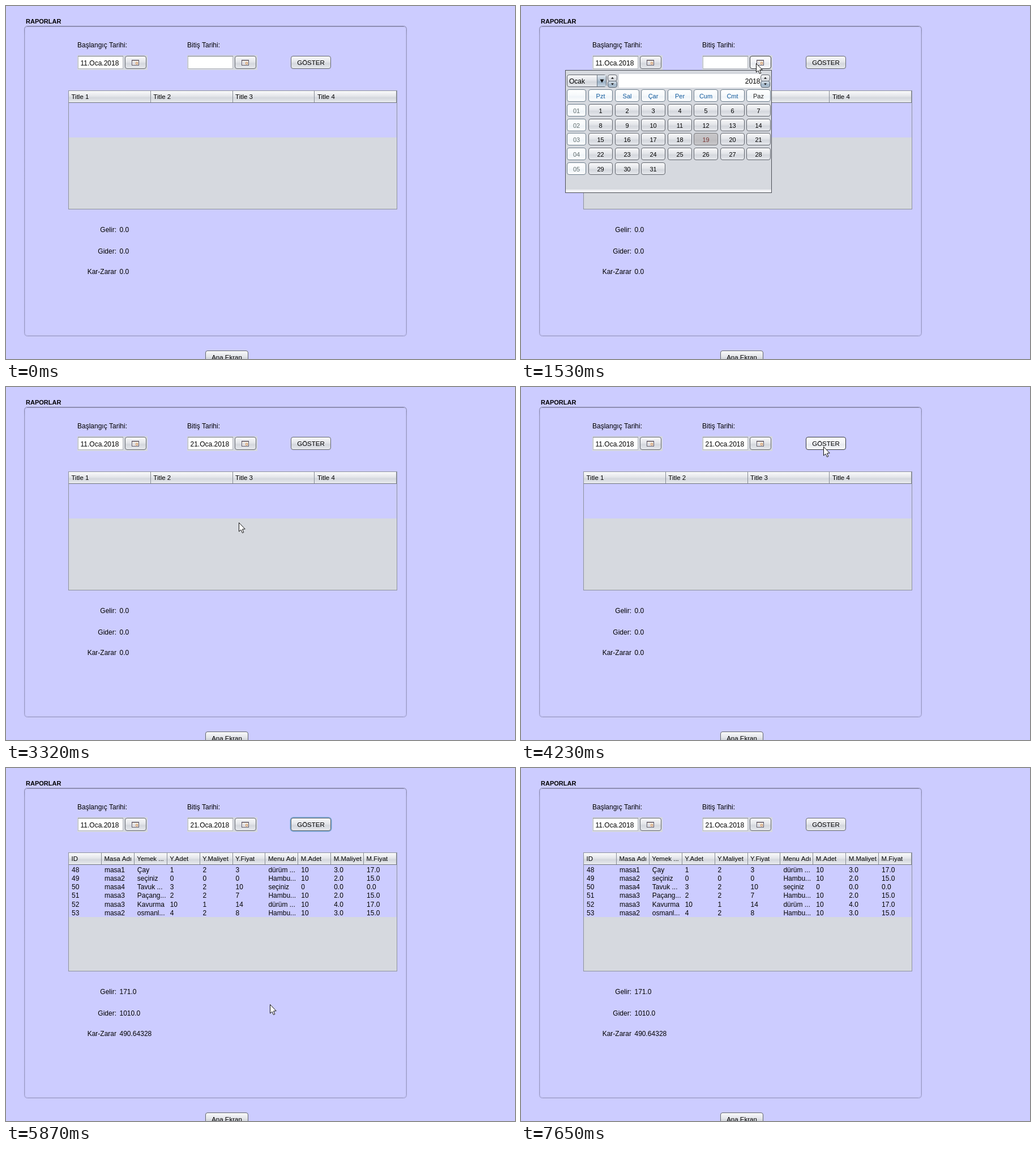
Write an HTML page with a canvas that moves like this. It is 899x623 px and loops after 7.72 s.

```html
<!DOCTYPE html>
<html lang="tr">
<head>
<meta charset="utf-8">
<title>Raporlar</title>
<style>
html, body { margin: 0; width: 100%; height: 100%; overflow: hidden; background: #ccccff; }
canvas { display: block; }
</style>
</head>
<body>
<canvas id="stage" width="899" height="623"></canvas>
<script>
const ctx = document.getElementById('stage').getContext('2d');
const LOOP = 7720;
const LILAC = '#ccccff', GRAY = '#d6d9df';

// Four gradient stops from top to bottom, then the border colour
const SKINS = {
  normal: ['#fafafb', '#e4e6ea', '#d4d7dd', '#e9ebef', '#62666e'],
  hover: ['#ffffff', '#f2f3f7', '#e8eaef', '#fbfcfd', '#34373d'],
  press: ['#78899b', '#8fa0b1', '#98a8b8', '#b5c2cf', '#33383f'],
  pale: ['#ffffff', '#f7fafc', '#eff4f8', '#ffffff', '#6c7d8c'],
  today: ['#c9c8ca', '#c2c1c4', '#bdbcbf', '#c9c8cb', '#77787d'],
  blue: ['#e2e9f0', '#b3c3d2', '#9bb1c5', '#c8d6e3', '#525e6c'],
};

// Pointer moves: first step, last step, number of steps, from, to
const MOVES = [
  [300, 530, 4, 775, 585, 446, 153],
  [830, 1160, 5, 446, 153, 415, 101],
  [1690, 2460, 11, 415, 101, 410, 237],
  [2530, 2530, 1, 410, 237, 411, 245],
  [2930, 3010, 2, 411, 245, 411, 239],
  [3630, 4230, 9, 411, 239, 534, 105],
  [5550, 5866, 5, 534, 105, 466, 417],
  [5945, 6100, 3, 466, 417, 455, 560],
  [6410, 6410, 1, 455, 560, 465, 572],
];

const ROWS = [
  '48|masa1|Çay|1|2|3|dürüm ...|10|3.0|17.0',
  '49|masa2|seçiniz|0|0|0|Hambu...|10|2.0|15.0',
  '50|masa4|Tavuk ...|3|2|10|seçiniz|0|0.0|0.0',
  '51|masa3|Paçang...|2|2|7|Hambu...|10|2.0|15.0',
  '52|masa3|Kavurma|10|1|14|dürüm ...|10|4.0|17.0',
  '53|masa2|osmanl...|4|2|8|Hambu...|10|3.0|15.0',
].map(row => row.split('|'));
const HEADS = 'ID|Masa Adı|Yemek ...|Y.Adet|Y.Maliyet|Y.Fiyat|Menu Adı|M.Adet|M.Maliyet|M.Fiyat'.split('|');
const TITLES = ['Title 1', 'Title 2', 'Title 3', 'Title 4'];
const DAYS = ['Pzt', 'Sal', 'Çar', 'Per', 'Cum', 'Cmt', 'Paz'];

function pointerAt(t) {
  if (t < 300 || t >= 6490) return null;
  const i = MOVES.findLastIndex(m => t >= m[0]);
  const [start, end, n, x0, y0, x1, y1] = MOVES[i];
  const gap = n > 1 ? (end - start) / (n - 1) : 1;
  const step = Math.min(n - 1, Math.floor((t - start) / gap + 1e-6));
  const p = i ? (step + 1) / n : step / (n - 1);
  return { x: Math.round(x0 + (x1 - x0) * p), y: Math.round(y0 + (y1 - y0) * p) };
}

const over = (p, x, y, w, h) => p && p.x >= x && p.x < x + w && p.y >= y && p.y < y + h;

function rect(x, y, w, h, fill) {
  ctx.fillStyle = fill;
  ctx.fillRect(x, y, w, h);
}

function frame(x, y, w, h, color) {
  ctx.strokeStyle = color;
  ctx.lineWidth = 1;
  ctx.strokeRect(x + .5, y + .5, w - 1, h - 1);
}

function text(s, x, y, { size = 12, color = '#000', align = 'left', bold = '' } = {}) {
  ctx.font = `${bold} ${size}px "Liberation Sans", Arial, sans-serif`;
  ctx.textAlign = align;
  ctx.fillStyle = color;
  ctx.fillText(s, x, y);
}

function shade(y, h, skin) {
  const g = ctx.createLinearGradient(0, y, 0, y + h);
  [0, .45, .6, 1].forEach((stop, i) => g.addColorStop(stop, SKINS[skin][i]));
  return g;
}

function rounded(x, y, w, h, r, stroke, { width = 1, fill } = {}) {
  ctx.beginPath();
  ctx.roundRect(x + .5, y + .5, w - 1, h - 1, r);
  if (fill) {
    ctx.fillStyle = fill;
    ctx.fill();
  }
  ctx.strokeStyle = stroke;
  ctx.lineWidth = width;
  ctx.stroke();
}

function button(x, y, w, h, skin, label, style) {
  rounded(x, y, w, h, 3.5, SKINS[skin][4], { fill: shade(y, h, skin) });
  if (label) text(label, x + w / 2, y + h / 2 + 4.5, { size: 11.5, align: 'center', ...style });
}

function triangle(x, y, w, h) {
  ctx.fillStyle = '#111';
  ctx.beginPath();
  ctx.moveTo(x - w / 2, y);
  ctx.lineTo(x + w / 2, y);
  ctx.lineTo(x, y + h);
  ctx.fill();
}

function dateChooser(x, value, skin) {
  rect(x, 87, 124, 26, GRAY);
  rect(x + 2, 89, 79, 22, '#fff');
  frame(x + 1, 88, 80, 23, '#b4b7be');
  rect(x + 1, 88, 80, 1, '#8b8e96');
  rect(x + 2, 89, 78, 1, '#dcdee2');
  text(value, x + 5.5, 104.5);
  button(x + 84, 88, 38, 23, skin);
  rect(x + 96, 95, 13, 10, '#f4f1ea');
  rect(x + 96, 95, 13, 2, '#a99a94');
  frame(x + 96, 95, 13, 10, '#595466');
  rect(x + 98, 99, 4, 4, '#d9d9e2');
  frame(x + 103, 99, 4, 4, '#c98a55');
}

function table(pointer, loaded) {
  const heads = loaded ? HEADS : TITLES;
  const step = loaded ? 57.9 : 144.8;
  rect(110, 149, 581, 210, GRAY);
  rect(111, 171, 579, loaded ? 92 : 61, LILAC);
  heads.forEach((head, i) => {
    const x = Math.round(111 + i * step), w = Math.round(111 + (i + 1) * step) - x;
    rect(x, 150, w, 20, shade(150, 20, over(pointer, x, 150, w, 20) ? 'hover' : 'normal'));
    rect(x + w - 1, 150, 1, 20, '#868b95');
    text(head, 115.5 + i * step, 164, { size: 11.5 });
  });
  rect(111, 170, 579, 1, '#6f747e');
  frame(110, 149, 581, 210, '#8d929c');
  if (loaded) ROWS.forEach((row, r) =>
    row.forEach((cell, c) => text(cell, 116 + c * step, Math.round(183.7 + r * 15.2))));
}

function spinner(x) {
  button(x, 121, 17, 12, 'normal');
  button(x, 132, 17, 12, 'blue');
  triangle(x + 8.5, 128.5, 5, -3);
  triangle(x + 8.5, 136.5, 5, 3);
}

function calendar(t, pointer) {
  rect(78, 113, 365, 217, GRAY);
  rect(79, 324, 363, 5, '#f1f2f5');
  frame(78, 113, 365, 217, '#4b4e55');

  button(81, 121, 70, 22, 'normal');
  rect(135, 122, 15, 20, shade(122, 20, 'blue'));
  rect(134, 122, 1, 20, '#6b7785');
  triangle(143, 129.5, 7, 6);
  text('Ocak', 85, 137);
  spinner(153);
  rect(173, 120, 251, 24, '#fff');
  text('2018', 422.5, 137, { align: 'right' });
  spinner(423);

  const small = color => ({ size: 11, color });
  const colX = c => Math.round(119 + c * 46.5);
  const rowY = r => Math.round(147.5 + r * 25.6);
  button(81, 147, 34, 22, 'pale');
  DAYS.forEach((day, c) => {
    const color = c < 6 ? '#10599c' : t < 1690 ? '#222' : '#a40000';
    button(colX(c), 147, 43, 22, 'pale', day, small(color));
  });
  for (let r = 1; r <= 5; r++) button(81, rowY(r), 34, 22, 'pale', '0' + r, small('#647070'));
  for (let d = 1; d <= 31; d++) {
    const x = colX((d - 1) % 7), y = rowY(1 + Math.floor((d - 1) / 7));
    let skin = d === 19 ? 'today' : 'normal';
    if (over(pointer, x, y, 43, 23)) skin = t >= 3170 ? 'press' : 'hover';
    button(x, y, 43, 22, skin, String(d), small(d === 19 ? '#7c3734' : '#000'));
  }
}

function arrow({ x, y }) {
  ctx.beginPath();
  [[0, 0], [0, 15.5], [3.5, 12.5], [6, 18], [8.3, 17], [6, 11.5], [10.7, 11.2]]
    .forEach(([dx, dy]) => ctx.lineTo(x + dx + .5, y + dy + .5));
  ctx.closePath();
  ctx.fillStyle = '#fff';
  ctx.fill();
  ctx.strokeStyle = '#111';
  ctx.lineWidth = 1;
  ctx.stroke();
}

function draw(t) {
  const pointer = pointerAt(t);
  const open = t >= 1530 && t < 3320;
  const loaded = t >= 4710;
  const skinOf = (x, w, from, to) =>
    t >= from && t < to ? 'press' : over(pointer, x, 88, w, 23) ? 'hover' : 'normal';

  rect(0, 0, 899, 623, LILAC);
  text('RAPORLAR', 35, 31, { size: 11, bold: 'bold' });
  const edge = ctx.createLinearGradient(0, 35, 0, 582);
  edge.addColorStop(0, '#7f7fa2');
  edge.addColorStop(.03, '#9898c0');
  edge.addColorStop(1, '#9c9cc6');
  rounded(33, 36, 674, 546, 5, '#b8b8e8');
  rounded(32, 35, 676, 548, 5, edge);
  rect(37, 36, 666, 1, '#9a9ac1');

  text('Başlangıç Tarihi:', 126, 72.5);
  text('Bitiş Tarihi:', 320, 72.5);
  dateChooser(126, '11.Oca.2018', 'normal');
  dateChooser(320, t >= 3320 ? '21.Oca.2018' : '', skinOf(404, 38, 1390, 1530));

  if (t >= 4640 && t < 7650) rounded(502, 87, 73, 25, 5, '#73a4d1', { width: 2 });
  button(503, 88, 71, 23, skinOf(503, 71, 4640, 4710), 'GÖSTER');

  table(open ? null : pointer, loaded);
  const totals = loaded ? ['171.0', '1010.0', '490.64328'] : ['0.0', '0.0', '0.0'];
  ['Gelir:', 'Gider:', 'Kar-Zarar'].forEach((label, i) => {
    const y = [399, 437, 473][i];
    text(label, 195, y, { align: 'right' });
    text(totals[i], 200.5, y);
  });
  button(352, 608, 76, 23, 'normal', 'Ana Ekran');

  if (open) calendar(t, pointer);
  if (pointer) arrow(pointer);
}

function tick() {
  draw(performance.now() % LOOP);
  requestAnimationFrame(tick);
}
tick();
</script>
</body>
</html>
```
